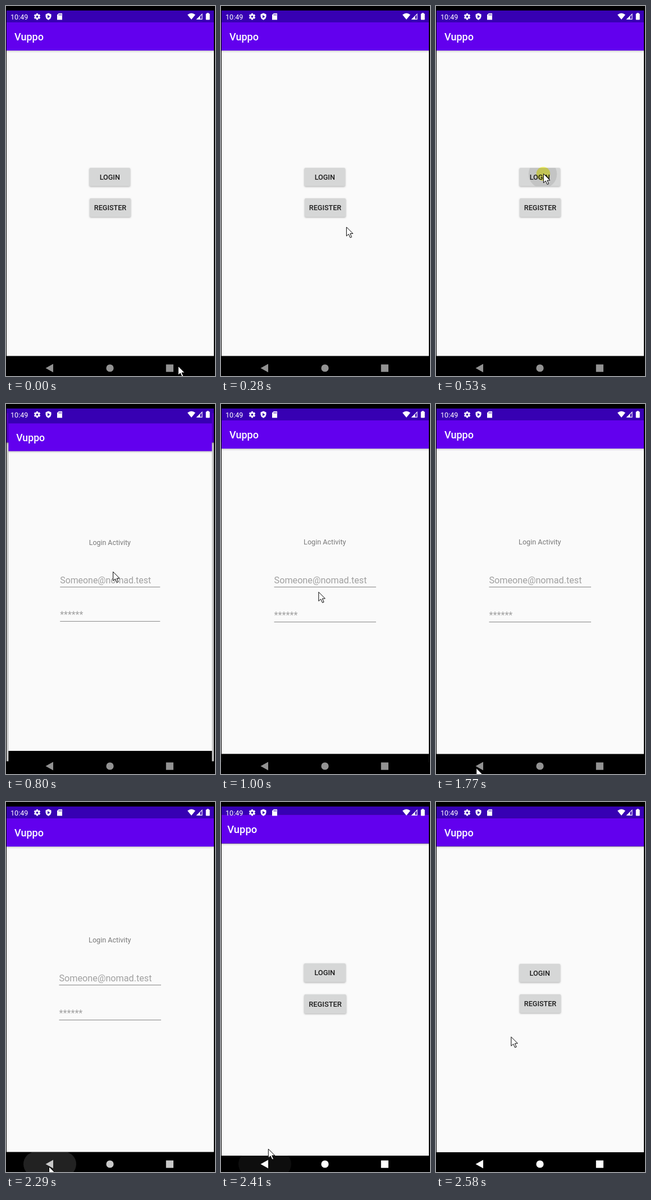
Animation of 372x656 px, one loop 2.63 s. Source, as an HTML page with a canvas:

```html
<!DOCTYPE html>
<html lang="en">
<head>
<meta charset="utf-8">
<title>Login demo</title>
<style>
html, body { margin: 0; width: 100%; height: 100%; overflow: hidden; background: #000; }
canvas { display: block; }
</style>
</head>
<body>
<canvas id="stage" width="372" height="656"></canvas>
<script>
const ctx = document.getElementById('stage').getContext('2d');
const LOOP = 2630, OPEN = 665, CLOSE = 2310, DURATION = 400;

// time, x, y of the pointer tip
const POINTER = [
  [0, 306, 638], [430, 191, 297], [900, 190, 297], [1360, 55, 588],
  [1700, 71, 645], [2200, 76, 646], [2340, 76, 646], [2700, 153, 337]
];
const CLICKS = [[490, 600], [2170, 2260]];

const clamp = v => Math.max(0, Math.min(1, v));
const ramp = (t, from, to) => clamp((t - from) / (to - from));
const mix = (a, b, p) => a + (b - a) * p;
const smooth = p => p * p * (3 - 2 * p);

function bezier(a, b, c, d, s) {
  const r = 1 - s;
  return r * r * r * a + 3 * r * r * s * b + 3 * r * s * s * c + s * s * s * d;
}

// Quick start with a very long settle, in two curve pieces
function settle(p) {
  const [xs, ys] = p < 1 / 6
    ? [[0, 0.05, 0.1333, 1 / 6], [0, 0, 0.06, 0.4]]
    : [[1 / 6, 0.2083, 0.25, 1], [0.4, 0.82, 1, 1]];
  let low = 0, high = 1;
  for (let i = 0; i < 20; i++) {
    const mid = (low + high) / 2;
    if (bezier(...xs, mid) < p) low = mid; else high = mid;
  }
  return bezier(...ys, low);
}

function rect(x, y, w, h, color) {
  ctx.fillStyle = color;
  ctx.fillRect(x, y, w, h);
}

function circle(x, y, r, color) {
  ctx.fillStyle = color;
  ctx.beginPath();
  ctx.arc(x, y, r, 0, Math.PI * 2);
  ctx.fill();
}

function polygon(points, color) {
  ctx.fillStyle = color;
  ctx.beginPath();
  points.forEach(([x, y]) => ctx.lineTo(x, y));
  ctx.closePath();
  ctx.fill();
}

function label(text, x, y, size, color, weight = 400, align = 'left') {
  ctx.font = `${weight} ${size}px Roboto, sans-serif`;
  ctx.textAlign = align;
  ctx.fillStyle = color;
  ctx.fillText(text, x, y);
}

function button(text, x, y, w, h, ripple) {
  ctx.save();
  ctx.shadowColor = 'rgba(0,0,0,.3)';
  ctx.shadowBlur = 3;
  ctx.shadowOffsetY = 1;
  ctx.fillStyle = '#d6d7d7';
  ctx.beginPath();
  ctx.roundRect(x, y, w, h, 2);
  ctx.fill();
  ctx.shadowColor = 'transparent';
  if (ripple) {
    ctx.clip();
    circle(190, 298, ripple.radius, `rgba(0,0,0,${ripple.alpha})`);
  }
  ctx.restore();
  label(text, x + w / 2, y + h / 2 + 4.3, 12.6, '#1c1c1c', 500, 'center');
}

function homeScreen(t) {
  const pressed = t > 495 && t < 900;
  const ripple = pressed && {
    radius: mix(20, 60, ramp(t, 495, 770)),
    alpha: 0.09 * (1 - ramp(t, 640, 800))
  };
  button('LOGIN', 148.5, 287, 72.5, 32.5, ripple);
  button('REGISTER', 149, 341, 73, 33, null);
}

function loginScreen() {
  label('Login Activity', 184.8, 248.5, 12.6, '#7a7a7a', 400, 'center');
  label('Someone@nomad.test', 94.5, 318, 16.2, '#a0a0a0');
  label('******', 94.5, 380, 16.2, '#a0a0a0');
  rect(94.5, 324, 181.5, 1, '#858585');
  rect(94.5, 386, 181.5, 1, '#858585');
}

function appWindow(drawContent, t, scale = 1, alpha = 1, dim = 0) {
  ctx.save();
  ctx.beginPath();
  ctx.rect(1, 8, 369, 648);
  ctx.clip();
  ctx.globalAlpha = alpha;
  ctx.translate(185.5, 325);
  ctx.scale(scale, scale);
  ctx.translate(-185.5, -325);
  rect(1, 8, 369, 21, '#3700b3');
  rect(1, 79, 369, 542, '#fafafa');
  rect(1, 29, 369, 50, '#6200ee');
  const shade = ctx.createLinearGradient(0, 79, 0, 83);
  shade.addColorStop(0, 'rgba(0,0,0,.17)');
  shade.addColorStop(1, 'rgba(0,0,0,0)');
  rect(1, 79, 369, 4, shade);
  rect(1, 620.5, 369, 36, '#000');
  label('Vuppo', 15, 61.3, 18, '#fff', 500);
  drawContent(t);
  if (dim) rect(1, 29, 369, 592, `rgba(0,0,0,${dim})`);
  ctx.restore();
}

function gear(x, y) {
  ctx.save();
  ctx.translate(x, y);
  for (let i = 0; i < 3; i++) {
    rect(-1.6, -5.7, 3.2, 11.4, '#fff');
    ctx.rotate(Math.PI / 3);
  }
  circle(0, 0, 4.3, '#fff');
  circle(0, 0, 1.9, '#3700b3');
  ctx.restore();
}

function statusBar() {
  const dark = '#3700b3';
  label('10:49', 8, 23.5, 12.6, '#fff');
  gear(55.5, 18.8);
  polygon([[75.5, 12.5], [80.5, 14.7], [80.5, 19], [79, 22.5], [75.5, 25],
    [72, 22.5], [70.5, 19], [70.5, 14.7]], '#fff');
  polygon([[74, 16], [78.5, 18.7], [74, 21.4]], dark);
  polygon([[93.8, 13], [100, 13], [100, 24.5], [91, 24.5], [91, 15.8]], '#fff');
  [93.8, 95.8, 97.8].forEach(x => rect(x, 14.5, 1, 2.3, dark));

  ctx.fillStyle = '#fff';
  ctx.beginPath();
  ctx.moveTo(330, 24);
  ctx.lineTo(323, 15.4);
  ctx.quadraticCurveTo(330, 10, 337, 15.4);
  ctx.fill();
  polygon([[349.5, 13], [349.5, 24], [338.5, 24]], '#fff');
  polygon([[345.7, 18.3], [348.3, 15.7], [348.3, 22.8], [345.7, 22.8]], dark);
  rect(357.5, 12.3, 3.4, 2, '#fff');
  ctx.beginPath();
  ctx.roundRect(355.7, 13.5, 7, 11, 1);
  ctx.fill();
}

function navBar(t) {
  const glow = ramp(t, 2195, 2250) * (1 - ramp(t, 2310, 2480));
  if (glow) {
    ctx.save();
    ctx.beginPath();
    ctx.rect(1, 621, 369, 35);
    ctx.clip();
    ctx.fillStyle = `rgba(255,255,255,${0.135 * glow})`;
    ctx.beginPath();
    ctx.roundRect(31, 620, 94, 44, 22);
    ctx.fill();
    ctx.restore();
  }
  const level = mix(146, 255, ramp(t, 2230, 2350));
  const color = `rgb(${level},${level},${level})`;
  polygon([[70.5, 642], [84, 634.5], [84, 649.5]], color);
  circle(185, 642, 6.6, color);
  rect(284.8, 635.5, 13.2, 13.2, color);
}

function pointer(t) {
  const i = POINTER.findIndex(key => key[0] > t);
  const [t0, x0, y0] = POINTER[i - 1], [t1, x1, y1] = POINTER[i];
  const p = smooth(ramp(t, t0, t1));
  const x = mix(x0, x1, p), y = mix(y0, y1, p);
  if (CLICKS.some(([from, to]) => t >= from && t < to)) {
    ctx.save();
    ctx.globalCompositeOperation = 'multiply';
    circle(x, y + 0.5, 12.3, '#ffff70');
    ctx.restore();
  }
  ctx.save();
  ctx.translate(x + 0.5, y + 0.5);
  polygon([[0, 0], [0, 16], [3.8, 12.5], [6.7, 18.8], [9.3, 17.7],
    [6.5, 11.7], [11.5, 11.5]], '#fff');
  ctx.strokeStyle = '#000';
  ctx.lineWidth = 1;
  ctx.stroke();
  ctx.restore();
}

function draw(t) {
  rect(0, 0, 372, 656, '#000');
  if (t < OPEN) {
    appWindow(homeScreen, t);
  } else if (t < OPEN + DURATION) {
    const p = settle((t - OPEN) / DURATION);
    appWindow(homeScreen, t, mix(1, 1.05, p), 1, 0.24 * p);
    appWindow(loginScreen, t, mix(0.85, 1, p), ramp(t, OPEN + 40, OPEN + 110));
  } else if (t < CLOSE) {
    appWindow(loginScreen, t);
  } else {
    const p = settle(ramp(t, CLOSE, CLOSE + DURATION));
    appWindow(homeScreen, t, mix(1.1, 1, p));
    const alpha = 1 - ramp(t, CLOSE + 33, CLOSE + 90);
    if (alpha) appWindow(loginScreen, t, mix(1, 0.9, p), alpha);
  }
  statusBar();
  navBar(t);
  pointer(t);
}

const start = performance.now();
function tick() {
  draw((performance.now() - start) % LOOP);
  requestAnimationFrame(tick);
}
tick();
</script>
</body>
</html>
```
